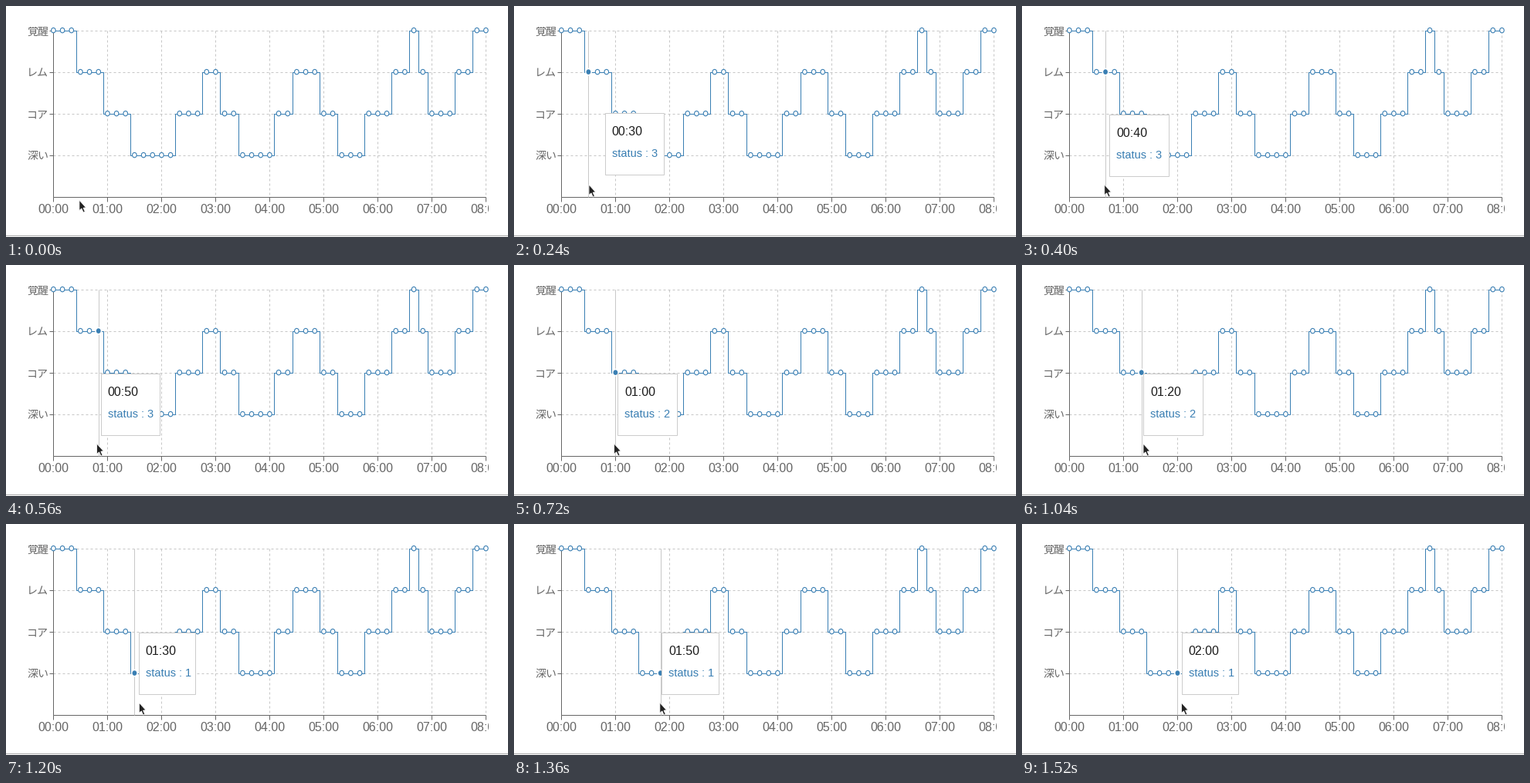
These frames come from a looping animation (650x300 px, 1600 ms). A matplotlib script:

```python
import numpy as np
import matplotlib.pyplot as plt
from matplotlib.animation import FuncAnimation
from matplotlib.patches import Ellipse, Polygon, Rectangle

W, H, DPI = 650, 300, 100
FRAMES, INTERVAL = 20, 80
PX = 72 / DPI  # one pixel in points

LEFT, TOP, BOTTOM = 61.4, 31.6, 247.6
HOUR, LEVEL = 70, 54
STEP = HOUR / 6  # ten minutes
RIGHT = LEFT + 8 * HOUR

BLUE, GREY, GRID = "#3a7fb3", "#666666", "#c6c6c6"

# sleep depth swings between a few turning points, rounded to whole stages
TURN_AT = [1, 11, 17.5, 22.5, 28, 33, 40, 43, 48]
TURN_LEVEL = [4, 0.7, 3, 0.6, 3, 0.64, 3.82, 1.6, 4.2]
STATUS = np.rint(np.interp(range(49), TURN_AT, TURN_LEVEL)).astype(int)

ARROW = np.array([(0, 0), (0, 13.6), (3, 10.9), (5.2, 16), (7.4, 15),
                  (5.2, 10.1), (8.8, 9.8)])

FIRST_HOVER = 2
TIP_START = np.array([144.0, 135.0])
TIP_EASE = 0.65  # share of the remaining way covered per frame


def px(i):
    return LEFT + i * STEP


def py(status):
    return TOP + (4 - status) * LEVEL


def mouse_at(frame):
    """Rise into the chart, then speed up to the right."""
    t = frame - 3
    rise, run = min(t, 0), max(t, 0)
    return np.array([97 + 0.7 * rise + 4.6 * run + 0.14 * run ** 2,
                     232 - 6.7 * rise])


def hovered(frame):
    return round((mouse_at(frame)[0] - 1.6 - LEFT) / STEP)


def tip_at(frame):
    """The tooltip eases towards the hovered sample."""
    pos = TIP_START
    for f in range(FIRST_HOVER + 1, frame + 1):
        goal = np.array([px(hovered(f)) + 7.4, 141])
        pos = pos + TIP_EASE * (goal - pos)
    return pos


fig = plt.figure(figsize=(W / DPI, H / DPI), dpi=DPI, facecolor="white")
ax = fig.add_axes([0, 0, 1, 1])
ax.set_xlim(0, W)
ax.set_ylim(H, 0)
ax.axis("off")


def line(xs, ys, color, z, **kw):
    return ax.plot(xs, ys, color=color, lw=PX, zorder=z,
                   solid_capstyle="butt", dash_capstyle="butt", **kw)[0]


def rect(x, y, w, h, color, z):
    ax.add_patch(Rectangle((x, y), w, h, fc=color, ec="none", zorder=z))


def label(x, y, text, size, color, z, font="Liberation Sans", ha="left"):
    return ax.text(x, y, text, fontsize=size * PX, color=color, zorder=z,
                   family=font, ha=ha, va="baseline")


def draw_axes():
    dashed = (0, (3, 3))
    for status, name in zip((4, 3, 2, 1), ("覚醒", "レム", "コア", "深い")):
        y = py(status)
        line([LEFT, RIGHT], [y, y], GRID, 1, ls=dashed)
        line([LEFT - 5, LEFT], [y, y], GREY, 2)
        label(55, y + 5.8, name, 14, GREY, 2, "Noto Sans CJK JP", "right")
    for hour in range(9):
        x = LEFT + hour * HOUR
        line([x, x], [TOP, BOTTOM], GRID, 1, ls=dashed)
        line([x, x], [BOTTOM, BOTTOM + 6], GREY, 2)
        label(x, 268.6, f"{hour:02d}:00", 16, GREY, 2, ha="center")
    line([LEFT, LEFT], [TOP, BOTTOM], GREY, 2)
    line([LEFT, RIGHT], [BOTTOM, BOTTOM], GREY, 2)
    # the chart is cut off at its top and right edges
    rect(0, 0, W, 27, "white", 3)
    rect(625, 0, W - 625, 290, "white", 3)
    rect(0, 298, W, 1, "#a8a8a8", 3)


def draw_series():
    edges = np.clip(px(np.arange(len(STATUS) + 1) - 0.5), LEFT, RIGHT)
    line(np.repeat(edges, 2)[1:-1], np.repeat(py(STATUS), 2), BLUE, 5)
    for i, status in enumerate(STATUS):
        ax.add_patch(Ellipse((px(i), py(status)), 5.6, 6.4, fc="white",
                             ec=BLUE, lw=1.1 * PX, zorder=6))


draw_axes()
draw_series()

guide = line([0, 0], [TOP, BOTTOM], "#c8c8c8", 4)
halo = ax.add_patch(Ellipse((0, 0), 9, 10, fc="white", ec="none", zorder=7))
dot = ax.add_patch(Ellipse((0, 0), 5.8, 6.6, fc=BLUE, ec="none", zorder=8))
box = ax.add_patch(Rectangle((0, 0), 76, 80, fc="white", ec="#cccccc",
                             lw=PX, zorder=9))
time_text = label(0, 0, "", 16, "#1c1c1c", 10)
status_text = label(0, 0, "", 14.5, BLUE, 10)
hover_parts = (guide, halo, dot, box, time_text, status_text)
mouse = ax.add_patch(Polygon(ARROW, closed=True, fc="#222222", ec="white",
                             lw=0.8 * PX, zorder=12))


def update(frame):
    mouse.set_xy(ARROW + mouse_at(frame))

    hovering = frame >= FIRST_HOVER
    for part in hover_parts:
        part.set_visible(hovering)
    if hovering:
        i = hovered(frame)
        status = STATUS[i]
        guide.set_xdata([px(i)] * 2)
        for part in (halo, dot):
            part.set_center((px(i), py(status)))

        x, y = tip_at(frame)
        box.set_xy((x, y))
        box.set_width(73.5 if status == 1 else 76.5)
        time_text.set_text(f"{i // 6:02d}:{i % 6}0")
        time_text.set_position((x + 9, y + 29))
        status_text.set_text(f"status : {status}")
        status_text.set_position((x + 9, y + 57.5))
    return (*hover_parts, mouse)


anim = FuncAnimation(fig, update, frames=FRAMES, interval=INTERVAL,
                     repeat=True, blit=False)
plt.show()
```
